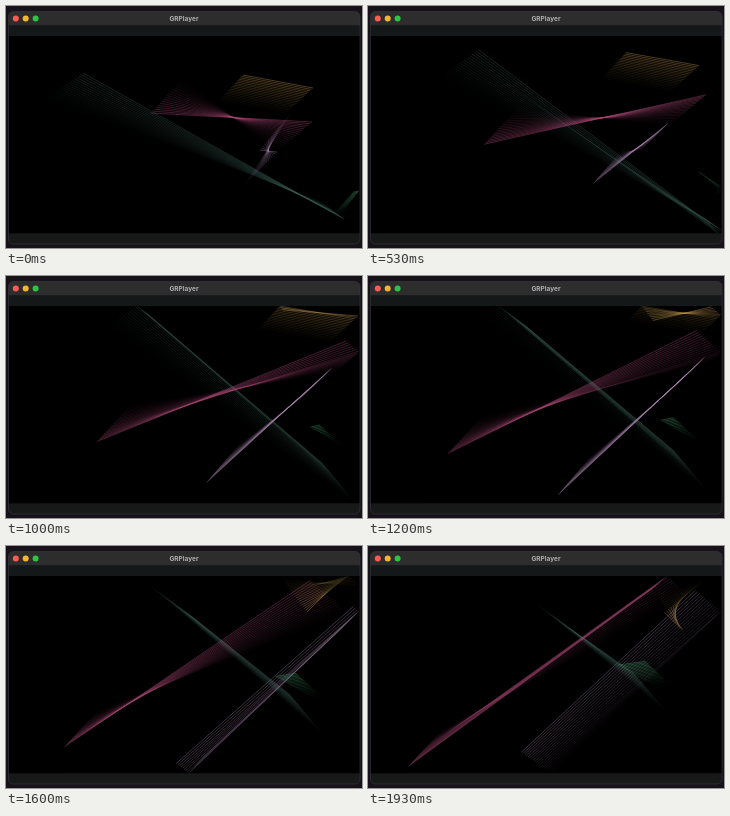
Recreate the animation shown at these times as an HTML page. Size 356x242 px, loop 2 s.

```html
<!DOCTYPE html>
<html lang="en">
<head>
<meta charset="utf-8">
<title>GRPlayer</title>
<style>
  html, body { margin: 0; width: 100%; height: 100%; overflow: hidden; background: #17121a; }
  svg { display: block; width: 100vw; height: 100vh; }
  text { font: 700 6.5px Inter, "Liberation Sans", sans-serif; fill: #b0b0b2; text-anchor: middle; }
</style>
</head>
<body>
<svg viewBox="0 0 356 242">
  <defs>
    <clipPath id="window"><rect x="2.5" y="5.5" width="351.5" height="232.5" rx="5"/></clipPath>
    <clipPath id="view"><rect x="3" y="30" width="350.5" height="197.5"/></clipPath>
  </defs>
  <rect width="356" height="242" fill="#17121a"/>
  <g clip-path="url(#window)">
    <rect y="5" width="356" height="14.5" fill="#2d2d2e"/>
    <rect y="19.5" width="356" height="10.5" fill="#151818"/>
    <rect y="30" width="356" height="197.5" fill="#000"/>
    <rect y="227.5" width="356" height="11" fill="#171818"/>
  </g>
  <circle cx="9.8" cy="12.6" r="3" fill="#ff5a52"/>
  <circle cx="19.7" cy="12.6" r="3" fill="#f6b62c"/>
  <circle cx="29.6" cy="12.6" r="3" fill="#27c83f"/>
  <text x="178" y="14.9">GRPlayer</text>
  <g id="ribbons" clip-path="url(#view)" stroke-width="0.55"></g>
  <rect x="2.5" y="5.5" width="351.5" height="232.5" rx="5" fill="none" stroke="#3a3a3c" stroke-width="0.6"/>
</svg>
<script>
const LOOP = 2000, TICKS = 30, TRAIL = 20, SUBSTEPS = 10;
const LEAD = TRAIL / 2; // ticks of history before the loop starts
const WALLS = { left: 3, right: 353, top: 30, bottom: 227 };
const layer = document.getElementById('ribbons');

// Flies straight and bounces off the walls; every bounce scales the velocity.
// Returns one position per half tick.
function fly(x, y, vx, vy, kickX = 1, kickY = 1) {
  const dt = 0.5 / SUBSTEPS, path = [];
  for (let i = 0; i <= (TICKS + LEAD) * 2 * SUBSTEPS; i++) {
    if (i % SUBSTEPS === 0) path.push([x, y]);
    x += vx * dt;
    y += vy * dt;
    const hitX = x < WALLS.left && vx < 0 || x > WALLS.right && vx > 0;
    const hitY = y < WALLS.top && vy < 0 || y > WALLS.bottom && vy > 0;
    if (hitX || hitY) {
      vx *= hitX ? -kickX : kickX;
      vy *= hitY ? -kickY : kickY;
    }
  }
  return path;
}

function ribbon(color, opacity, a, b) {
  const lines = [];
  for (let age = TRAIL - 1; age >= 0; age--) {
    const line = document.createElementNS('http://www.w3.org/2000/svg', 'line');
    line.setAttribute('stroke', color);
    line.setAttribute('stroke-opacity', opacity * (1 - age / TRAIL) ** 1.2);
    layer.append(line);
    lines[age] = line;
  }
  return { a, b, lines };
}

const ribbons = [
  ribbon('#3c6359', 0.65, fly(35, 96, 4.2, -2.9, 1.16, 1.24), fly(308, 191, 3, 2.2, 1.1, 1.4)),
  ribbon('#ad4a78', 0.75, fly(181, 68, -3.6, 3.9), fly(266, 150, 4, -3.4)),
  ribbon('#c89e52', 0.7, fly(210.5, 97, 2.64, -2.8, 1.03, 1.28), fly(277, 110, 3, -2.8, 1.2, 1.1)),
  ribbon('#b08ab6', 0.65, fly(289, 102.5, -3.53, 4.15, 0.93, 0.56), fly(235, 182, 3.62, -3.59, 1.1, 0.9)),
  ribbon('#3f9064', 0.85, fly(324, 212, 2.34, -2.58, 1.65, 0.89), fly(334, 209, 1.9, -2.4, 1.37, 1))
];

function draw(time) {
  // The small shift keeps ticks on a 10 ms grid.
  const tick = Math.floor((time % LOOP + 3.4) * TICKS / LOOP) % TICKS;
  for (const { a, b, lines } of ribbons) {
    lines.forEach((line, age) => {
      const at = (tick + LEAD) * 2 - age;
      const [x1, y1] = a[at], [x2, y2] = b[at];
      Object.entries({ x1, y1, x2, y2 }).forEach(([name, value]) => line.setAttribute(name, value));
    });
  }
}

const start = performance.now();
function frame() {
  draw(performance.now() - start);
  requestAnimationFrame(frame);
}
frame();
</script>
</body>
</html>
```
